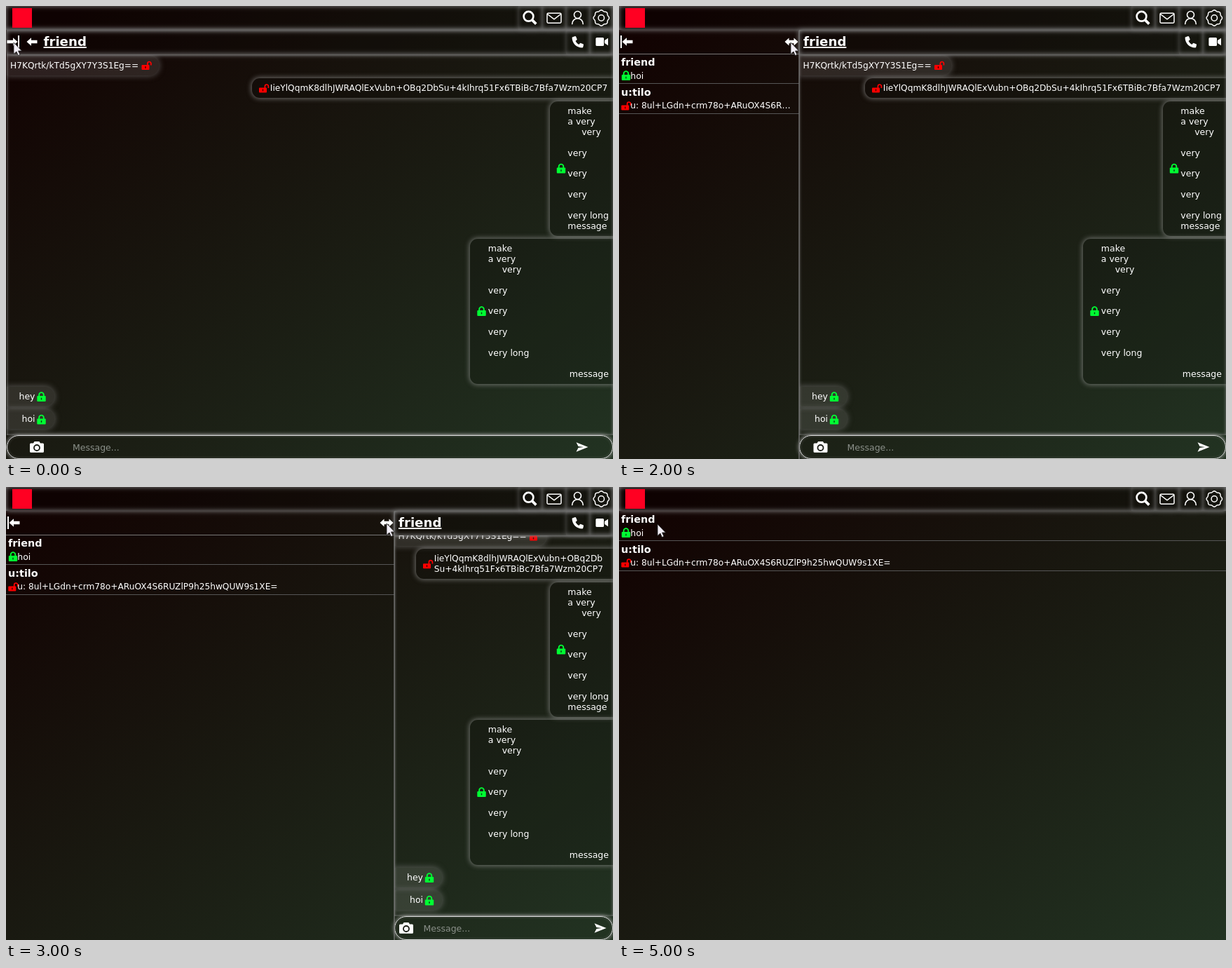
These frames come from a looping animation (866x646 px, 6000 ms). An HTML page:

```html
<!DOCTYPE html>
<html lang="en">
<head>
<meta charset="utf-8">
<title>Resizable chat panes</title>
<style>
html, body { margin: 0; width: 100%; height: 100%; overflow: hidden; background: #111; }
#stage { position: relative; width: 866px; height: 646px; overflow: hidden;
  background: linear-gradient(to bottom right, #100, #232); }
#stage div, svg { position: absolute; box-sizing: border-box; }
svg { left: 0; top: 0; }
.scene, .clip { inset: 0; }
.bar { background: #0003; box-shadow: 0 0 7px #888, inset 0 0 7px #888; }
.cell { box-shadow: 0 0 6px #7778, inset 0 0 6px #7778; }
.pane { box-shadow: inset 0 0 4px #888; }
.in { border-radius: 0 14px 14px 0; background: #ffffff1c; box-shadow: 0 0 8px 1px #8888; }
.out { border-radius: 11px 0 0 11px; background: #0002; box-shadow: 0 0 7px 1px #aaa9; }
.pill { border: 1.3px solid #ddd; border-radius: 17px; box-shadow: 0 0 6px #aaa, inset 0 0 4px #8886; }
text { font: 12.5px "DejaVu Sans", sans-serif; fill: #fff; white-space: pre; }
.code { font-size: 12.2px; }
.name { font-size: 14.4px; font-weight: bold; }
.title { font-size: 18.2px; font-weight: bold; text-decoration: underline; }
.hint { fill: #8b908a; }
</style>
</head>
<body>
<div id="stage"></div>
<script>
const W = 866, H = 646, LINE = 14.92, STEP = 1000;
const KEY = 'H7KQrtk/kTd5gXY7Y3S1Eg==';
const CIPHER = ['IieYlQqmK8dlhJWRAQlExVubn+OBq2Db', 'Su+4kIhrq51Fx6TBiBc7Bfa7Wzm20CP7'];
const NOTE = ['make', 'a very', '     very', '', 'very', '', 'very', '', 'very', '', 'very long'];
const FULL = ['friend', 'u:tilo', 'u: 8ul+LGdn+crm78o+ARuOX4S6RUZlP9h25hwQUW9s1XE='];

// left: chat pane edge; list: contact name, contact name, preview
const scenes = [
  { left: 0.5, cursor: [11, 52], camera: 44, send: 822, hint: 95 },
  { left: 44.5, cursor: [33, 49], camera: 85, send: 824, hint: 134.5, list: ['fri…', 'u:…', 'u…'] },
  { left: 257, cursor: [245, 52], camera: 287.5, send: 834, hint: 325.5,
    list: ['friend', 'u:tilo', 'u: 8ul+LGdn+crm78o+ARuOX4S6R…'] },
  { left: 554, cursor: [543, 52], camera: 571, send: 848, hint: 595.5, list: FULL, wrap: true },
  { left: 751.5, cursor: [14, 53], camera: 768, send: 848, hint: 792.5, list: FULL, narrow: true },
  { left: W, cursor: [55, 53], list: FULL, closed: true }
];

const box = (cls, x, y, w, h) =>
  `<div class="${cls}" style="left:${x}px;top:${y}px;width:${w}px;height:${h}px"></div>`;
const svg = body => `<svg width="${W}" height="${H}">${body}</svg>`;
const at = (x, y, body) => `<g transform="translate(${x} ${y})">${body}</g>`;
const fill = (d, color = '#fff') => `<path d="${d}" fill="${color}"/>`;
const line = (d, width = 1.5, color = '#fff') =>
  `<path d="${d}" fill="none" stroke="${color}" stroke-width="${width}" stroke-linejoin="round"/>`;
const ring = (x, y, r, width, color = '#fff') =>
  `<circle cx="${x}" cy="${y}" r="${r}" fill="none" stroke="${color}" stroke-width="${width}"/>`;
const text = (x, y, str, cls = '', anchor = 'start') =>
  `<text x="${x}" y="${y}" class="${cls}" text-anchor="${anchor}">${str}</text>`;
const lines = (x, y, rows, cls) => rows.map((row, i) => row && text(x, y + i * LINE, row, cls)).join('');

const lock = (x, cy) => at(x, cy - 7,
  line('M2.9 7V4.4a3.3 3.3 0 0 1 6.6 0V7', 1.9, '#0f3') +
  fill('M1 6H11.4Q12.4 6 12.4 7V13Q12.4 14 11.4 14H1Q0 14 0 13V7Q0 6 1 6Z', '#0f3') +
  fill('M5.5 8.8h1.4v2.6h-1.4z', '#0a3a12'));
const openLock = (x, cy) => at(x, cy - 6.5,
  line('M8.4 7V4a2.5 2.5 0 0 1 5 0V6.4', 1.7, '#f00') +
  fill('M1 6H10Q11 6 11 7V12Q11 13 10 13H1Q0 13 0 12V7Q0 6 1 6Z', '#f00') +
  fill('M4.8 8h1.4v3h-1.4z', '#400'));

const ARROW = 'M0 0L6.5 -5.8V-2.2H15V2.2H6.5V5.8Z';
const DOUBLE = 'M-9.5 0L-3.5 -5.5V-2.2H3.5V-5.5L9.5 0L3.5 5.5V2.2H-3.5V5.5Z';
const pointer = ([x, y]) => at(x, y,
  `<path d="M0 0V16.5L3.9 13L6.4 18.6L9 17.4L6.5 12H11.5Z" fill="#f2eef6" stroke="#222" stroke-width=".8"/>`);

function gear() {
  let d = '';
  for (let i = 0; i <= 96; i++) {
    const a = i / 96 * 2 * Math.PI, r = 10.5 + 0.7 * Math.cos(8 * a);
    d += `${i ? 'L' : 'M'}${(r * Math.cos(a)).toFixed(2)} ${(r * Math.sin(a)).toFixed(2)}`;
  }
  return line(d, 1.5) + ring(0, 0, 4.2, 1.5);
}

function topBar() {
  const cells = [731, 765, 799, 833].map(x => box('cell', x, 0, 34, 34)).join('');
  return box('bar', 0, 0, W, 34) + cells + svg(
    '<rect x="9" y="3" width="28" height="28" fill="#f02"/>' +
    ring(745.5, 14.8, 6.9, 2.7) + line('M750.3 19.6L756.3 25.6', 3.7) +
    line('M773.5 10.2H790.5Q792 10.2 792 11.7V22.8Q792 24.2 790.5 24.2H773.5Q772 24.2 772 22.8V11.7Q772 10.2 773.5 10.2ZM772.4 11.5L782 18.8L791.6 11.5') +
    ring(815.5, 12.5, 5, 1.6) + line('M807.6 26.3C807.6 14.8 823.4 14.8 823.4 26.3', 1.6) +
    at(849.3, 17, gear()));
}

function sidebar(s) {
  const dy = s.closed ? -34 : 0, [first, second, preview] = s.list;
  const rule = (y, color) => line(`M0 ${y + 0.5}H${s.left}`, 1, color);
  let art = text(3, 85 + dy, first, 'name') + lock(3.8, 99 + dy) + text(16.3, 103.5 + dy, 'hoi') +
    text(3, 128 + dy, second, 'name') + openLock(3.3, 142 + dy) + text(16.3, 146 + dy, preview, 'code') +
    rule(110 + dy, '#555') + rule(153 + dy, '#555');
  if (!s.closed) art += rule(68, '#777') + line(`M${s.left} 35V${H}`, 1.3, '#777') +
    fill('M2 42h2v18h-2z') + at(4.5, 51, fill(ARROW)) + at(s.left - 11, 51, fill(DOUBLE));
  return svg(art);
}

function messages(s) {
  const { left, wrap, narrow } = s;
  let boxes = box('pane', left, 69, W - left, 543), art = '';
  const received = (cy, str, width, open) => {
    boxes += box('in', left, cy - 14, width, 28);
    art += open
      ? text(left + 5.5, cy + 4.4, str, 'code') + openLock(left + 193, cy)
      : text(left + 41, cy + 4.4, str, '', 'end') + lock(left + 43.8, cy + 0.5);
  };
  const sent = (x, y, h, rows, cls, lockY) => {
    boxes += box('out', x, y, W - x, h);
    art += lines(x + 25.8, y + 18.4, rows, cls) +
      (cls ? openLock(x + 10, lockY) : lock(x + 10.3, lockY));
  };

  if (narrow) {
    boxes += box('out', 763, 40, W - 763, 77);
    art += lines(788.8, 76.5, ['6TBiBc7Bf', 'a7Wzm20C', 'P7'], 'code');
    sent(775.5, 120.5, 192, [...NOTE, 'message'], '', 216.5);
    sent(763, 316.5, 222, [...NOTE, '', '', 'message'], '', 427.5);
  } else {
    received(wrap ? 70 : 84.5, KEY, 217, true);
    if (wrap) sent(585, 88, 43, CIPHER, 'code', 109.7);
    else sent(351, 103, 28, [CIPHER.join('')], 'code', 117);
    sent(775.5, 135.5, 192, [...NOTE, 'message'], '', 231.5);
    sent(662, 331.5, 207, NOTE, '', 435);
    art += text(860, 528.5, 'message', '', 'end');
  }
  received(556.5, 'hey', 68, false);
  received(589, 'hoi', 68, false);
  return `<div class="clip" style="clip-path:inset(69px 0 34px ${left}px)">${boxes}${svg(art)}</div>`;
}

function chat(s) {
  const { left, narrow } = s, first = !s.list;
  const frame = box('bar', left, 34, W - left, 35) + box('cell', 799, 34, 34, 35) +
    box('cell', 833, 34, 33, 35) + box('pill', left, 612, W - left - 0.5, 33.5);
  const title = text(first ? 53.5 : left + 6, 57.2, narrow ? 'fr…' : 'friend', 'title');
  const nav = first
    ? at(16.5, 51, `<g transform="scale(-1 1)">${fill(ARROW)}</g>`) + fill('M17 42h2v18h-2z') + at(29.5, 51, fill(ARROW))
    : '';
  const phone = fill('M808.5 44.2L812 43.1Q812.8 43 813.2 43.8L814.6 47.2Q814.8 48 814.2 48.5L812.5 50Q814.2 53.4 817.4 55L818.8 53.2Q819.4 52.6 820.1 52.9L823.4 54.3Q824.2 54.7 824 55.5L823.2 58.7Q823 59.5 822.1 59.5C813.5 59.5 807.6 52.6 807.6 45.2Q807.6 44.4 808.5 44.2Z');
  const video = fill('M843 45H851.5Q853 45 853 46.5V55.5Q853 57 851.5 57H843Q841.4 57 841.4 55.5V46.5Q841.4 45 843 45ZM854 49L859 45.8V56.2L854 53Z');
  const camera = at(s.camera, 629,
    fill('M-8.5 -5.5H-5L-3.4 -8H3.4L5 -5.5H8.5Q10 -5.5 10 -4V6.3Q10 7.8 8.5 7.8H-8.5Q-10 7.8 -10 6.3V-4Q-10 -5.5 -8.5 -5.5Z') +
    ring(0, 1, 4, 1.8, '#1a1c16'));
  const send = at(s.send, 629, fill('M-8.5 -6.8L8.5 0L-8.5 6.8L-5.5 1L2 0L-5.5 -1Z'));
  const hint = lines(s.hint, 633.5, narrow ? ['Mes', 'sage'] : ['Message...'], 'hint');
  return messages(s) + frame + svg(title + nav + phone + video + camera + send + hint);
}

const stage = document.getElementById('stage');
stage.innerHTML = scenes.map(s => '<div class="scene">' +
  (s.closed ? '' : chat(s)) + topBar() + (s.list ? sidebar(s) : '') + svg(pointer(s.cursor)) +
  '</div>').join('');

function draw(now) {
  const current = Math.floor(now / STEP) % scenes.length;
  [...stage.children].forEach((el, i) => { el.style.visibility = i === current ? 'visible' : 'hidden'; });
}
const start = performance.now();
function tick() {
  draw(performance.now() - start);
  requestAnimationFrame(tick);
}
tick();
</script>
</body>
</html>
```
